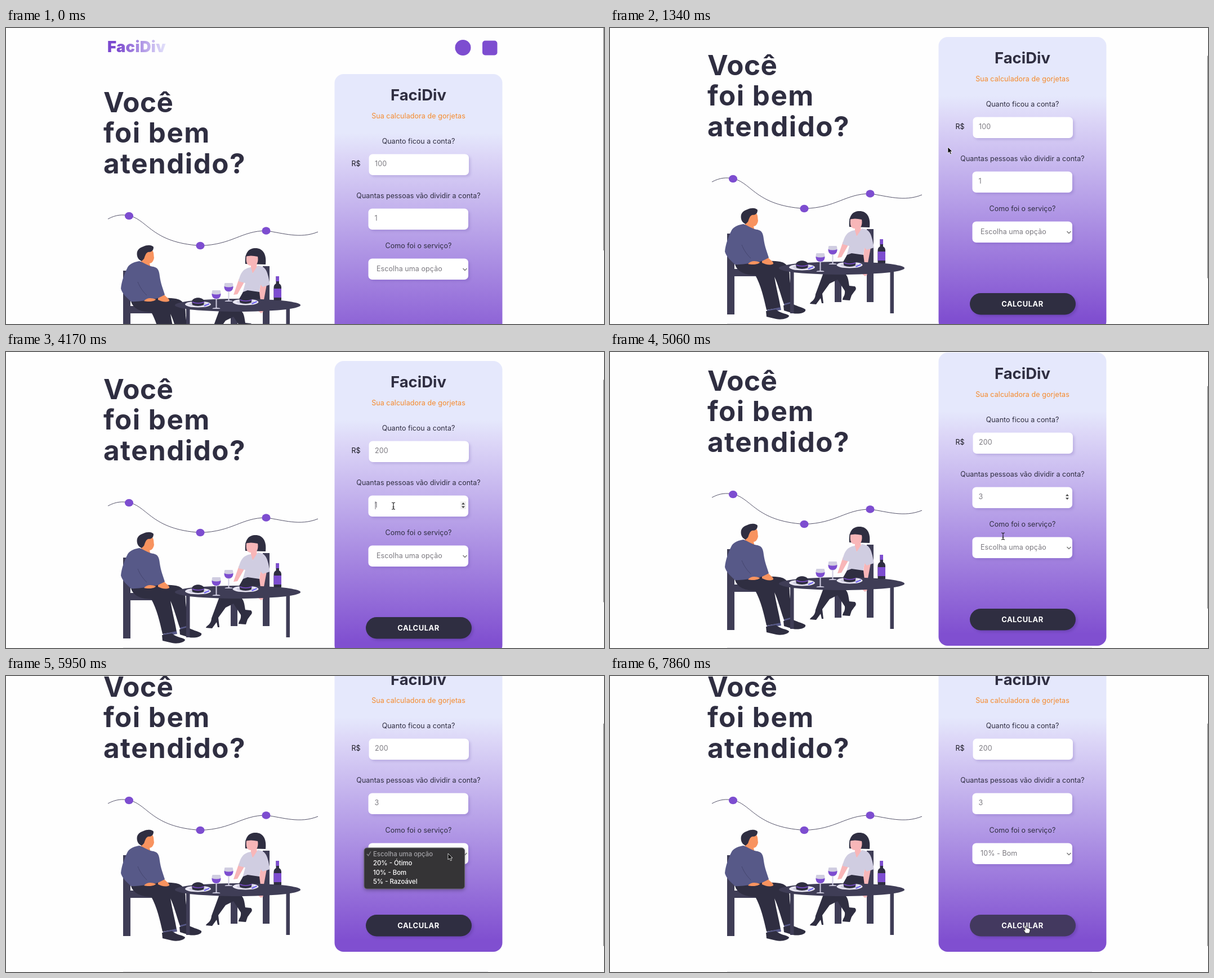
These frames come from a looping animation (1062x527 px, 8 s). An HTML page:

```html
<!DOCTYPE html>
<html lang="pt-BR">
<head>
<meta charset="utf-8">
<title>FaciDiv</title>
<style>
html, body { margin: 0; width: 100%; height: 100%; overflow: hidden; background: #fefefe }
svg { display: block; font: 12.5px Inter, "Open Sans", sans-serif; fill: #2f2e41 }
.mid { text-anchor: middle }
.bold { font-weight: 700 }
.value { fill: #7c7a80; letter-spacing: .08px }
.field { fill: #fff; filter: drop-shadow(3.5px 3.5px 2px rgba(70, 40, 150, .17)) }
.menu text { font-size: 11.4px; font-weight: 500; fill: #fff }
.wood { fill: #3f3d56 }
.dark { fill: #2f2e41 }
.purple { fill: #7d4dd0 }
.skin { fill: #f8935f }
.rose { fill: #f8b6b8 }
.pale { fill: #d0cde1 }
</style>
</head>
<body>
<svg width="1062" height="527" viewBox="0 0 1062 527">
<defs>
  <linearGradient id="card" x2="0" y2="1">
    <stop offset=".2" stop-color="#e5e8fc"/><stop offset=".28" stop-color="#dcd6f7"/>
    <stop offset=".6" stop-color="#b096e5"/><stop offset=".96" stop-color="#804fd0"/>
  </linearGradient>
  <linearGradient id="brand" gradientUnits="userSpaceOnUse" x1="181" x2="286">
    <stop offset=".15" stop-color="#7b49cf"/><stop offset="1" stop-color="#e6e6fc"/>
  </linearGradient>
  <g id="glass">
    <path class="pale" d="M-7 0H7C10 9 6 15 1 16V31Q7 31 7 33H-7Q-7 31-1 31V16C-6 15-10 9-7 0Z"/>
    <path class="purple" d="M-8 6Q0 9 8 6C8 12 5 15 0 15S-8 12-8 6Z"/>
  </g>
  <g id="dish">
    <ellipse fill="#e9e7f3" rx="23" ry="5.5"/>
    <ellipse class="pale" rx="16" ry="3.5"/>
    <path class="dark" d="M-11-5C-10-14 10-14 11-5L10 1Q0 5-10 1Z"/>
    <path d="M-10-4Q0 0 11-4" fill="none" stroke="#7d4dd0" stroke-width="1.6"/>
    <path d="M11 3L20-1" stroke="#6c5ff0" stroke-width="2"/>
  </g>
</defs>

<path d="M208 526.5H856" stroke="#dcdce0"/>

<g id="page">
  <text x="180" y="43" font-size="27.500" font-weight="900" letter-spacing=".2" fill="url(#brand)">FaciDiv</text>
  <circle class="purple" cx="811.5" cy="35" r="14"/>
  <rect class="purple" x="846" y="22.500" width="26.500" height="26" rx="5"/>

  <g class="bold" font-size="49.3" letter-spacing="1.5">
    <text x="173" y="150" letter-spacing=".5">Você</text><text x="173" y="204">foi bem</text><text x="173" y="258.500">atendido?</text>
  </g>

  <path d="M181 340C196 332 207 332 218 334C252 341 258 382 345 387.500C402 386 418 361 462 361C492 365 522 376 554 363" fill="none" stroke="#3f3d56" stroke-width=".9"/>
  <g class="purple">
    <ellipse cx="218.500" cy="334.500" rx="7.600" ry="6.800"/>
    <ellipse cx="345" cy="387.500" rx="7.600" ry="6.800"/>
    <ellipse cx="462" cy="361" rx="7.600" ry="6.800"/>
  </g>

  <g transform="translate(0 66)">
    <!-- chairs -->
    <path class="wood" d="M208 366H221V429H270V442H221V510H208ZM456 358H468V488H456ZM399 436H411V488H399Z"/>
    <!-- man -->
    <path class="dark" d="M222 421C240 416 285 413 302 416C318 419 319 432 319 446L324 488 309 492C302 472 298 455 292 443C295 462 300 480 303 498L278 502C273 480 268 458 258 440C240 440 226 434 222 421Z"/>
    <path fill="#575988" d="M279 502L303 497 304 502 279 506ZM309 491L324 487 326 492 310 496Z"/>
    <path class="dark" d="M277 504L295 501C302 508 313 508 318 512C318 517 305 520 295 518L278 514ZM308 494L322 490C330 495 341 497 347 501C349 507 335 510 325 508L309 503Z"/>
    <path class="skin" d="M270 412L281 409C286 414 291 417 290 420C284 423 276 421 270 418Z"/>
    <path class="skin" d="M250 333L260 330C263 334 262 338 263 343C262 349 259 353 255 353L257 361 238 352 243 344C245 338 248 336 250 333Z"/>
    <path fill="#575988" d="M237 349C246 352 252 358 262 359C270 361 272 366 273 376C275 390 279 399 282 409L270 415C258 417 235 422 222 421C214 414 206 406 204 398C205 386 210 372 216 360C220 353 230 350 237 349Z"/>
    <path class="skin" d="M245 420C250 414 258 414 266 417C265 421 252 422 245 420Z"/>
    <path d="M234 386C238 396 243 403 250 410" fill="none" stroke="#45466f"/>
    <path class="dark" d="M233 340C231 330 236 326 244 323C252 319 260 321 262 324C262 331 258 333 252 333C248 335 247 340 245 345L241 349C236 347 234 344 233 340Z"/>
    <!-- woman -->
    <path class="dark" d="M425 354C423 333 432 326 443 326C456 326 463 336 461 355Z"/>
    <path class="rose" d="M427 340L446 337C449 346 447 352 445 355L448 369 434 371 435 357C427 357 426 350 427 340Z"/>
    <path class="dark" d="M425 341Q434 338 447 341L448 334 430 332Z"/>
    <path class="rose" d="M414 380L424 385 411 408 404 409ZM452 390L463 391 458 418 448 420ZM448 438Q453 433 457 439L453 442Z"/>
    <path class="pale" d="M435 360L438 371 447 357C460 358 463 365 466 377L469 391 456 395 452 391 449 408 420 406 425 388 413 385C416 372 420 362 435 360Z"/>
    <path class="dark" d="M421 404L429 401 450 404 452 420H412ZM379 436H415C423 440 423 448 425 459L435 460C438 463 437 466 434 469L429 476 426 485 413 484C413 479 418 477 417 468L404 448 390 455 377 473 379 490 376 490 374 481 366 492 355 491C357 486 364 486 365 474Z"/>
    <!-- table -->
    <path class="wood" d="M320 430H326.500V508H320ZM497.500 430H504V508H497.500Z"/>
    <ellipse class="wood" cx="411.500" cy="427.500" rx="111.500" ry="11.500"/>
    <use href="#dish" x="341" y="426"/>
    <use href="#dish" x="425.500" y="422"/>
    <use href="#glass" x="373.500" y="401"/>
    <use href="#glass" x="395.500" y="388"/>
    <path class="dark" d="M479.500 376H485V389Q489 391 489 396V419H475.500V396Q475.500 391 479.500 389Z"/>
    <path class="purple" d="M479.500 376H485V385H479.500ZM475.500 398H489V414H475.500Z"/>
  </g>

  <rect x="583.500" y="82" width="298" height="522" rx="16" fill="url(#card)"/>
  <g class="mid">
    <text class="bold" x="732.500" y="129" font-size="27.500">FaciDiv</text>
    <text x="732.500" y="161" letter-spacing=".07" fill="#f58a2c">Sua calculadora de gorjetas</text>
    <text x="732.500" y="206">Quanto ficou a conta?</text>
    <text x="732.500" y="303">Quantas pessoas vão dividir a conta?</text>
    <text x="732.500" y="392">Como foi o serviço?</text>
  </g>
  <text x="613.500" y="246" fill="#17161f">R$</text>
  <rect class="field" x="644.500" y="224.500" width="177.500" height="37.500" rx="7"/>
  <rect class="field" x="643.500" y="321.500" width="177.500" height="37.500" rx="7"/>
  <rect class="field" x="643.500" y="410.500" width="177.500" height="37.500" rx="7"/>
  <g class="value">
    <text id="bill" x="655" y="246"/>
    <text id="people" x="654.500" y="343"/>
    <text id="service" x="658" y="432.500"/>
  </g>
  <path d="M811.500 428L815 431.500 818.500 428" fill="none" stroke="#777" stroke-width="1.400"/>
  <g id="spin">
    <rect id="spinBg" x="-5" y="-7" width="10" height="14" fill="#efefef"/>
    <path d="M-3-1.5L0-5 3-1.5ZM-3 1.5L0 5 3 1.5Z" fill="#444"/>
  </g>
  <rect id="caret" width="1" height="14" fill="#77757c"/>
  <rect id="button" x="639" y="538" width="188" height="38.500" rx="19.250" style="filter:drop-shadow(3px 3px 2px rgba(40,20,90,.2))"/>
  <text class="mid bold" x="732.500" y="561.700" font-size="13" letter-spacing=".5" fill="#fff">CALCULAR</text>
</g>

<g id="menu" class="menu" style="filter:drop-shadow(0 2px 3px rgba(0,0,0,.3))">
  <rect x="636" y="306" width="178.500" height="73" rx="5" fill="#353436" stroke="#69676c"/>
  <rect id="hover" x="636.500" width="177.500" height="16.500" fill="#2663d8"/>
  <path d="M641 317L643.500 320 648 312.500" fill="none" stroke="#8d8c90" stroke-width="1.200"/>
  <text x="652" y="320.500" style="fill:#a3a2a6">Escolha uma opção</text>
  <text x="652" y="337">20% - Ótimo</text>
  <text x="652" y="353.500">10% - Bom</text>
  <text x="652" y="370">5% - Razoável</text>
</g>

<rect id="thumb" x="1060.800" width="1.200" height="396" fill="#858585"/>

<g id="pointer">
  <path id="arrow" d="M0 0V11L2.600 8.600 4.500 12.800 6.400 12 4.600 8H8Z" fill="#000" stroke="#fff" stroke-width=".8"/>
  <path id="beam" d="M-3-6Q0-6 0-4.500Q0-6 3-6M0-5V5M-3 6Q0 6 0 4.500Q0 6 3 6M-1.500 2H1.500" fill="none" stroke="#111" stroke-width="1.100"/>
  <path id="hand" d="M-1 1Q0-1 1.500 1V5Q3 4 4 5.500Q6 5 6.500 6.500Q8 6 8 8V10L6.500 14H0L-3.500 8.500Q-3 7-1 8.500Z" fill="#fff" stroke="#222" stroke-width=".9"/>
</g>
</svg>
<script>
const $ = id => document.getElementById(id);
const show = (id, on) => $(id).style.display = on ? '' : 'none';
const move = (id, x, y) => $(id).setAttribute('transform', `translate(${x} ${y})`);

// Tracks hold each value until the next key: [time, ...values]
const scrolls = [[0, 0], [900, 18], [1040, 39.5], [1190, 58], [1340, 66],
  [4910, 70], [5060, 81], [5210, 98], [5360, 108], [5500, 113]];
const pointers = [[0, 0, 0, ''], [450, 548, 227, 'arrow'], [600, 551, 230, 'arrow'],
  [1340, 600, 212, 'arrow'], [1480, 670, 190, 'beam'], [1630, 693, 183, 'beam'],
  [3420, 693, 189, 'beam'], [3570, 692, 206, 'arrow'], [3720, 690, 232, 'beam'],
  [3870, 688, 258, 'beam'], [4020, 688, 274, 'beam'],
  [4770, 692, 298, 'arrow'], [4910, 698, 328, 'beam'], [5360, 715, 326, 'arrow'],
  [5500, 750, 321, 'arrow'], [5650, 785, 316, 'arrow'],
  [6100, 783, 321, 'arrow'], [6250, 774, 331, 'arrow'], [6400, 761, 340, 'arrow'],
  [6540, 750, 346, 'arrow'], [6690, 744, 346, 'arrow'], [6830, 742, 344, 'arrow'],
  [6970, 743, 345, 'arrow'], [7420, 743, 362, 'arrow'], [7570, 741, 396, 'arrow'],
  [7720, 739, 433, 'hand'], [7860, 738, 444, 'hand']];
const bills = [[0, '100'], [2380, '2'], [2670, '20'], [2820, '200']];
const carets = [[0, -1], [1630, 0], [1930, -1], [2380, 1], [2670, 2], [2820, 3],
  [3270, -1], [4170, 0], [4620, 1], [5060, -1]];
const at = (track, t) => track.findLast(key => key[0] <= t).slice(1);

function draw(now) {
  const t = now % 8000;
  const [scroll] = at(scrolls, t), [x, y, kind] = at(pointers, t), [caret] = at(carets, t);
  const second = t >= 4020;
  move('page', 0, -scroll);
  move('thumb', 0, scroll * .75);
  move('pointer', x, y);
  for (const id of ['arrow', 'beam', 'hand']) show(id, id === kind);

  $('bill').textContent = at(bills, t)[0];
  $('people').textContent = t < 4620 ? '1' : '3';
  $('service').textContent = t < 7270 ? 'Escolha uma opção' : '10% - Bom';
  show('caret', caret >= 0);
  move('caret', 655.5 + Math.max(caret, 0) * 7.7, second ? 332 : 235);
  show('spin', t >= 1480 && t < 5650);
  show('spinBg', t < 4770);
  move('spin', second ? 812 : 812.5, second ? 339 : 242);

  const row = Math.floor((y - 325) / 16.5);
  show('menu', t >= 5800 && t < 7270);
  show('hover', row >= 0 && row < 3);
  move('hover', 0, 325 + row * 16.5);
  $('button').setAttribute('fill', kind === 'hand' ? '#43395f' : '#2f2e41');
  requestAnimationFrame(draw);
}
draw(0);
</script>
</body>
</html>
```
